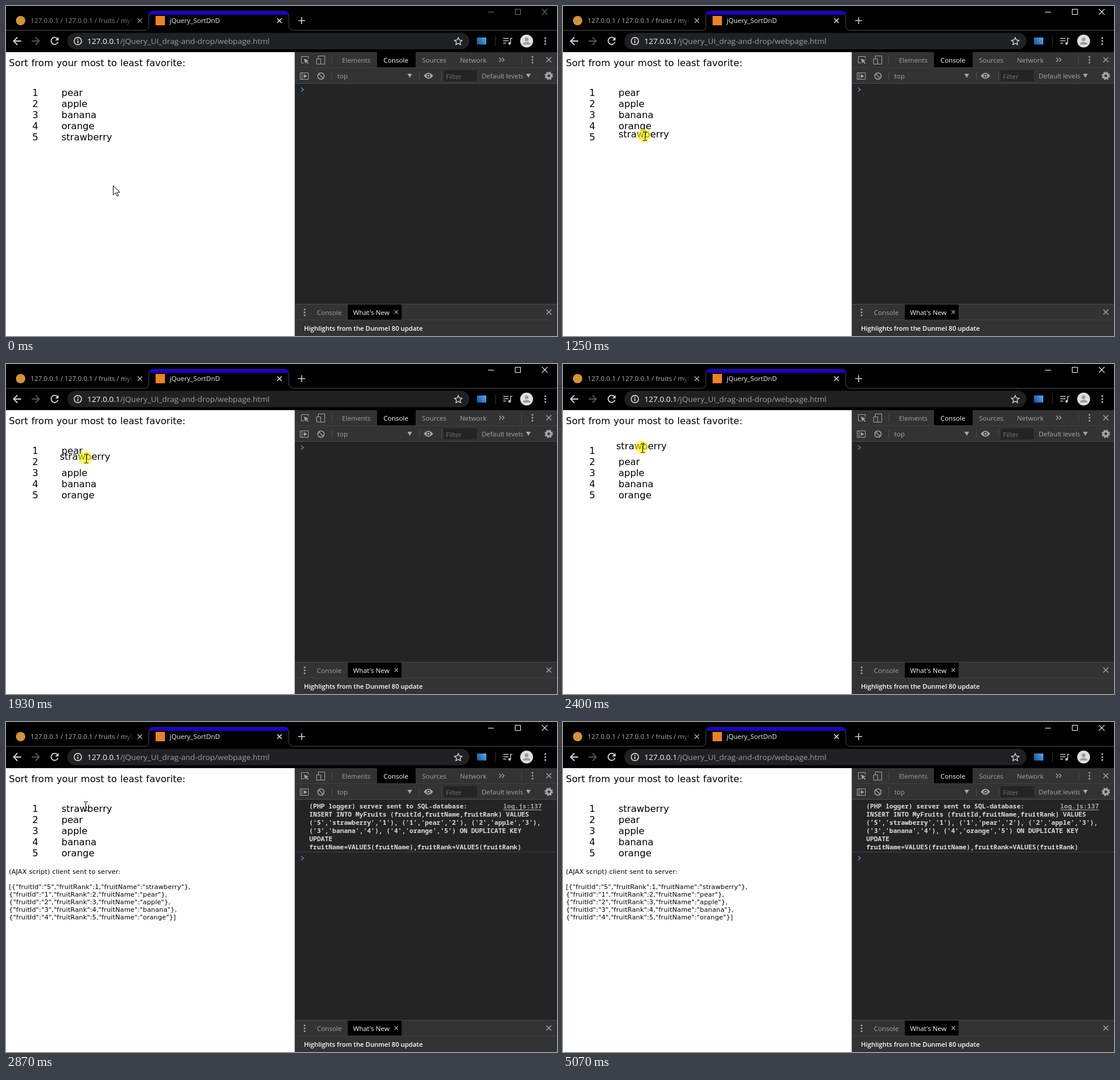
Animation of 943x565 px, one loop 5.99 s. Source, as an HTML page with a canvas:

```html
<!DOCTYPE html>
<html lang="en">
<head>
<meta charset="utf-8">
<title>Sortable list</title>
<style>
html, body { margin: 0; width: 100%; height: 100%; overflow: hidden; background: #000; }
canvas { display: block; width: 943px; height: 565px; }
</style>
</head>
<body>
<canvas id="stage" width="943" height="565"></canvas>
<script>
const ctx = document.getElementById('stage').getContext('2d', { alpha: false });
const LOOP = 5990, FOCUS = 1010, DROP = 2800, LOGGED = 2870;
const UI = '11.4px "Open Sans", sans-serif';
const UI_STRONG = '600 11px "Open Sans", sans-serif';
const URL_FONT = '13.35px "Open Sans", sans-serif';
const PAGE = '16px "DejaVu Sans", sans-serif';
const SMALL = '11px "DejaVu Sans", sans-serif';
const MONO = '600 11px "Noto Sans Mono", monospace';
const GREY = '#a5a5a5', PANEL = '#333333', RULE = '#4b4b4b';

const rect = (x, y, w, h, color) => { ctx.fillStyle = color; ctx.fillRect(x, y, w, h); };
const fill = (d, color) => { ctx.fillStyle = color; ctx.fill(new Path2D(d)); };
const stroke = (d, color, width = 1) => {
  ctx.strokeStyle = color;
  ctx.lineWidth = width;
  ctx.stroke(new Path2D(d));
};
const text = (s, x, y, font, color, spacing = 0) => {
  ctx.font = font;
  ctx.letterSpacing = spacing + 'px';
  ctx.fillStyle = color;
  ctx.fillText(s, x, y);
};
const disc = (x, y, r, color) => {
  ctx.fillStyle = color;
  ctx.beginPath();
  ctx.arc(x, y, r, 0, 7);
  ctx.fill();
};
const ring = (x, y, r, color, width = 1, dash = []) => {
  ctx.strokeStyle = color;
  ctx.lineWidth = width;
  ctx.setLineDash(dash);
  ctx.beginPath();
  ctx.arc(x, y, r, 0, 2 * Math.PI);
  ctx.stroke();
  ctx.setLineDash([]);
};
const cross = (x, y, r, color, width = 1.4) =>
  stroke(`M${x - r} ${y - r}L${x + r} ${y + r}M${x + r} ${y - r}L${x - r} ${y + r}`, color, width);
const dots = (x, y, gap, color) => [-gap, 0, gap].forEach(d => disc(x, y + d, 1.5, color));
const caret = (x, y, color) => fill(`M${x - 4} ${y - 3}h8l-4 7z`, color);
const prompt = y => stroke(`M505 ${y - 3.5}L509 ${y}L505 ${y + 3.5}`, '#4a90e2', 1.4);

// Pointer moves: start, end, steps, target x, target y, easing
const linear = u => u;
const smooth = u => u * u * (3 - 2 * u);
const speedUp = u => u ** 1.66;
const slowDown = u => 1 - (1 - u) ** 1.6;
const moves = [
  [80, 610, 8, 141, 231, smooth],
  [700, 780, 2, 140, 228, linear],
  [1160, 1700, 8, 139, 178, speedUp],
  [1780, 2080, 5, 136, 152, linear],
  [2250, 2400, 3, 136, 144, linear],
  [4350, 4350, 1, 231, 233, linear],
  [4430, 4900, 7, 844, 559, slowDown],
  [4980, 4980, 1, 845, 562, linear],
  [5070, 5070, 1, 845, 600, linear]
];

function pointerAt(t) {
  let x = 183, y = 307;
  for (const [start, end, steps, tx, ty, ease] of moves) {
    if (t < start) break;
    const step = Math.floor((t - start) / (end - start || 1) * (steps - 1) + 0.05) + 1;
    const u = ease(Math.min(step, steps) / steps);
    x += (tx - x) * u;
    y += (ty - y) * u;
  }
  return { x: Math.round(x), y: Math.round(y) };
}

function drawTabs(focused) {
  const idle = focused ? '#b4b4b4' : '#8c8c8c';
  const frame = focused ? '#ffffff' : '#777777';
  rect(0, 0, 943, 79, '#000');
  stroke('M0 41.5H237q7.5 0 7.5-8V17q0-8 8-8H476q8 0 8 8V33.5q0 8 8 8H943', RULE);
  fill('M245 15v-1q0-5 6-5h227q6 0 6 5v1z', '#1c00cc');

  disc(25, 25, 8, '#d3933a');
  text('127.0.0.1 / 127.0.0.1 / fruits / myfruits', 42, 29, UI, idle);
  const fade = ctx.createLinearGradient(204, 0, 217, 0);
  fade.addColorStop(0, 'rgba(0,0,0,0)');
  fade.addColorStop(1, '#000');
  rect(204, 15, 13, 20, fade);
  rect(217, 15, 27, 20, '#000');
  cross(229, 25, 3.8, idle);

  rect(256, 17, 16, 16, '#ee8122');
  text('jQuery_SortDnD', 280, 29, UI, '#f1f1f1');
  cross(468, 25, 3.8, '#f1f1f1');
  stroke('M500 25h12M506 19v12', '#d0d0d0', 1.6);

  stroke('M825 10.5h10M871.5 5.5h9v9h-9z', frame);
  cross(922, 10, 4.8, frame, 1.1);
}

function drawToolbar() {
  stroke('M26 60H13M19.5 53.5L13 60l6.5 6.5', '#d8d8d8', 1.8);
  stroke('M44 60H57M50.5 53.5L57 60l-6.5 6.5', '#555', 1.8);
  stroke('M88 56A6 6 0 1 0 89 61.5', '#d8d8d8', 1.8);
  fill('M90 53v6h-6z', '#d8d8d8');

  ctx.fillStyle = '#202124';
  ctx.beginPath();
  ctx.roundRect(105, 46, 688, 28, 14);
  ctx.fill();
  ring(123, 60, 6.3, '#e8e8e8', 1.5);
  rect(122.2, 59, 1.6, 4.5, '#e8e8e8');
  rect(122.2, 56.3, 1.6, 1.7, '#e8e8e8');
  const host = '127.0.0.1';
  text(host, 139, 65, URL_FONT, '#ffffff');
  text('/jQuery_UI_drag-and-drop/webpage.html', 139 + ctx.measureText(host).width, 65, URL_FONT, '#9aa0a6');
  stroke('M774 54l1.9 4.2 4.6.5-3.4 3.1.9 4.5-4-2.3-4 2.3.9-4.5-3.4-3.1 4.6-.5z', '#e0e0e0', 1.3);

  const sky = ctx.createLinearGradient(806, 66, 822, 54);
  sky.addColorStop(0, '#0f4f9e');
  sky.addColorStop(1, '#5aaef0');
  rect(806, 54, 16, 12, sky);
  rect(837, 52, 1, 17, '#333');
  stroke('M851 55.5h9M851 59.5h9M851 63.5h5M863.5 64V55.5h3', '#c4c4c4', 1.5);
  disc(861.8, 64, 2.2, '#c4c4c4');

  disc(891, 60, 11, '#dfe0e2');
  disc(891, 57, 3.3, '#9b9da1');
  fill('M884.5 66q0-4.5 6.5-4.5t6.5 4.5z', '#9b9da1');
  dots(923, 60, 5, '#c8c8c8');
}

function drawPanel(logged) {
  rect(494, 79, 449, 486, '#242424');
  rect(494, 79, 449, 54, PANEL);
  rect(494, 79, 1, 486, RULE);
  rect(495, 105, 448, 1, '#3f3f3f');
  rect(495, 132, 448, 1, RULE);

  stroke('M510 97.5H505.5V86.5H517.5V90', GREY);
  fill('M510 90l8 3.2-3.3 1.2 3.2 3.4-1.3 1.2-3.2-3.3-1.4 3z', GREY);
  stroke('M534.5 90V85.5H545.5V99.5H539M531.5 90.5h7v9h-7z', GREY);
  rect(557, 85, 1, 15, RULE);
  rect(635, 79, 66, 26, '#000');
  text('Elements', 575, 97, UI, GREY);
  text('Console', 646, 97, UI, '#ffffff');
  text('Sources', 712, 97, UI, GREY);
  text('Network', 777, 97, UI, GREY);
  stroke('M844 88.5l3.5 3.5-3.5 3.5M849 88.5l3.5 3.5-3.5 3.5', GREY, 1.3);
  rect(882, 85, 1, 15, RULE);
  dots(901, 92, 5, GREY);
  cross(929, 92, 4.3, GREY);

  stroke('M503.5 114.5h14v11h-14zM506.5 114.5v11', GREY);
  fill('M509.5 116.5l6 3.5-6 3.5z', GREY);
  ring(539, 120, 5.5, GREY, 1.5);
  stroke('M535 116l8 8', GREY, 1.5);
  rect(557, 112, 1, 15, RULE);
  text('top', 567, 124, UI, GREY);
  caret(691, 119, GREY);
  rect(707, 112, 1, 15, RULE);
  fill('M715 119.5q8-10 16 0q-8 10-16 0z', GREY);
  disc(723, 119.5, 3.2, PANEL);
  disc(723, 119.5, 1.8, GREY);
  rect(745, 112, 1, 15, RULE);
  rect(749, 110, 57, 19, '#242424');
  text('Filter', 753, 125, UI, '#777777');
  text('Default levels', 814, 124, UI, GREY);
  caret(894, 119, GREY);
  ring(929, 119.5, 4, GREY, 3.4);
  ring(929, 119.5, 6, GREY, 2.4, [2.6, 2.11]);

  if (logged) drawLog();
  prompt(logged ? 233 : 143);

  rect(495, 510, 448, 55, PANEL);
  rect(495, 510, 448, 1, RULE);
  rect(495, 537, 448, 1, '#3f3f3f');
  dots(511, 524.5, 5, GREY);
  text('Console', 532, 529, UI, GREY);
  rect(585, 511, 92, 26, '#000');
  text("What's New", 594, 529, UI, '#ffffff');
  cross(668, 524, 3, GREY, 1.1);
  cross(929, 524, 4.3, GREY);
  text('Highlights from the Dunmel 80 update', 510, 556, UI_STRONG, '#ffffff');
}

function drawLog() {
  [
    '(PHP logger) server sent to SQL-database:',
    'INSERT INTO MyFruits (fruitId,fruitName,fruitRank) VALUES',
    "('5','strawberry','1'), ('1','pear','2'), ('2','apple','3'),",
    "('3','banana','4'), ('4','orange','5') ON DUPLICATE KEY",
    'UPDATE',
    'fruitName=VALUES(fruitName),fruitRank=VALUES(fruitRank)'
  ].forEach((line, i) => text(line, 519, 148 + 14 * i, MONO, '#dcdcdc'));
  text('log.js:137', 851, 148, MONO, '#a8a8a8');
  rect(851, 150, 66, 1, '#a8a8a8');
  rect(495, 222, 448, 1, '#404040');
}

function drawPage(t, pointer) {
  rect(0, 79, 494, 486, '#fff');
  ctx.wordSpacing = '0.6px';
  text('Sort from your most to least favorite:', 5, 103, PAGE, '#000');
  ctx.wordSpacing = '0px';

  const held = t >= FOCUS && t < DROP;
  const dx = pointer.x - 140, dy = pointer.y - 228;
  const climbed = t < FOCUS ? 0 : held ? Math.max(0, Math.min(4, Math.floor((5.5 - dy) / 19))) : 4;
  const fruits = ['pear', 'apple', 'banana', 'orange'];
  fruits.splice(4 - climbed, 0, 'strawberry');
  fruits.forEach((fruit, i) => {
    const y = 154 + 19 * i;
    text(i + 1, 45, y, PAGE, '#000');
    if (held && fruit === 'strawberry') text(fruit, 95 + dx, 230 + dy, PAGE, '#000');
    else text(fruit, 95, y, PAGE, '#000');
  });

  if (t >= DROP) {
    text('(AJAX script) client sent to server:', 5, 260, SMALL, '#000', 0.15);
    const ids = [5, 1, 2, 3, 4];
    fruits.forEach((fruit, i) => {
      const row = `{"fruitId":"${ids[i]}","fruitRank":${i + 1},"fruitName":"${fruit}"}`;
      text((i ? '' : '[') + row + (i < 4 ? ',' : ']'), 5, 286 + 13 * i, SMALL, '#000', 0.15);
    });
  }
  if (held) disc(pointer.x - 1.5, pointer.y - 1.3, 11.5, 'rgba(255,245,0,0.6)');
}

function drawPointer(t, { x, y }) {
  if (t < 4350 && y <= 234) {
    stroke(`M${x - 3} ${y - 7.5}h3M${x + 1} ${y - 7.5}h3M${x + 0.5} ${y - 7}v14` +
      `M${x - 3} ${y + 7.5}h3M${x + 1} ${y + 7.5}h3`, '#000');
    return;
  }
  const arrow = `M${x + 0.5} ${y + 0.5}v16l3.8-3.6 2.6 5.6 2.4-1.1-2.5-5.4h5z`;
  fill(arrow, '#fff');
  stroke(arrow, '#000');
}

function draw(t) {
  const pointer = pointerAt(t);
  drawTabs(t >= FOCUS);
  drawToolbar();
  drawPage(t, pointer);
  drawPanel(t >= LOGGED);
  drawPointer(t, pointer);
}

const begin = performance.now();
function tick() {
  draw((performance.now() - begin) % LOOP);
  requestAnimationFrame(tick);
}
tick();
</script>
</body>
</html>
```
